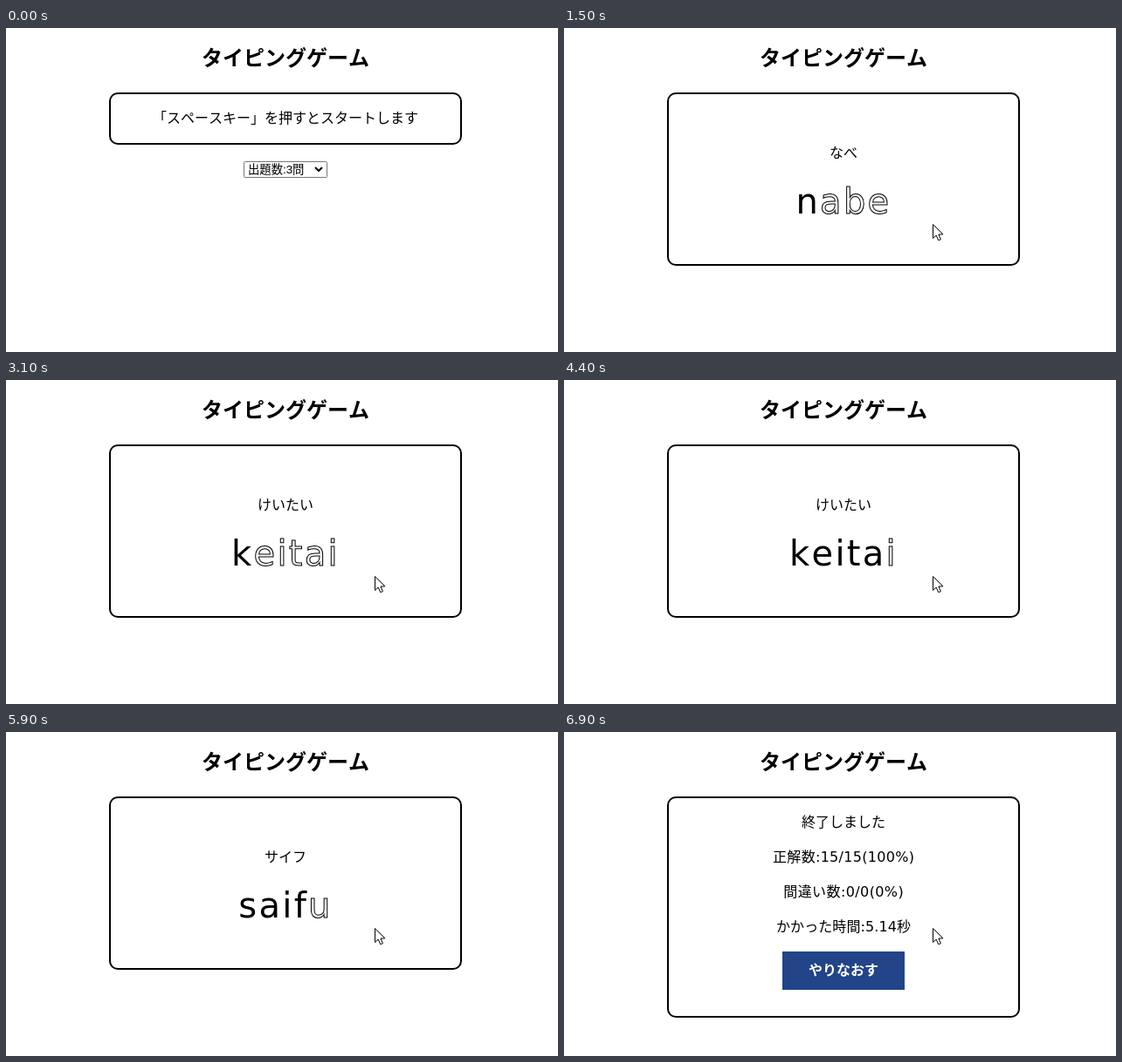
Animation, 632 px wide and 372 px high, one loop 7200 ms. Source, as an HTML page with a canvas:

```html
<!DOCTYPE html>
<html lang="ja">
<head>
<meta charset="utf-8">
<title>タイピングゲーム</title>
<style>
  html, body { margin: 0; width: 100%; height: 100%; overflow: hidden; background: #fff; }
  canvas { display: block; width: 632px; height: 372px; }
</style>
</head>
<body>
<canvas id="stage"></canvas>
<script>
const W = 632, H = 372, MID = 320;
const LOOP = 7200, STEP = 100;
const START = 800, END = 6000;
const JP = '"Noto Sans CJK JP", "Noto Sans CJK", sans-serif';
const MIXED = '"DejaVu Sans", ' + JP;
const FORM = '"Liberation Sans", ' + JP;

// keys: time at which each letter is typed; the last one ends the word
const WORDS = [
  { kana: 'なべ', text: 'nabe', keys: [1500, 1800, 2000, 2200] },
  { kana: 'けいたい', text: 'keitai', keys: [3100, 3200, 3600, 3900, 4300, 4500] },
  { kana: 'サイフ', text: 'saifu', keys: [5200, 5300, 5500, 5800, END] }
];

const canvas = document.getElementById('stage');
const scale = window.devicePixelRatio || 1;
canvas.width = Math.round(W * scale);
canvas.height = Math.round(H * scale);
const ctx = canvas.getContext('2d');

function label(text, y, { font = '16px ' + MIXED, color = '#000', spacing = 0 } = {}) {
  ctx.font = font;
  ctx.fillStyle = color;
  ctx.letterSpacing = spacing + 'px';
  ctx.textAlign = 'center';
  ctx.fillText(text, MID + spacing / 2, y);
  ctx.letterSpacing = '0px';
  ctx.textAlign = 'left';
}

function panel(height) {
  ctx.strokeStyle = '#000';
  ctx.lineWidth = 2;
  ctx.beginPath();
  ctx.roundRect(119, 75, 402, height - 2, 9);
  ctx.stroke();
}

function select() {
  ctx.strokeStyle = '#767676';
  ctx.lineWidth = 1;
  ctx.beginPath();
  ctx.roundRect(272.5, 153.5, 95, 18, 1);
  ctx.stroke();
  ctx.font = '13.333px ' + FORM;
  ctx.fillStyle = '#000';
  ctx.fillText('出題数:3問', 277, 167);
  ctx.strokeStyle = '#000';
  ctx.lineWidth = 2;
  ctx.beginPath();
  ctx.moveTo(354, 160);
  ctx.lineTo(358, 164);
  ctx.lineTo(362, 160);
  ctx.stroke();
}

function startScreen() {
  panel(60);
  label('「スペースキー」を押すとスタートします', 109);
  select();
}

function typingScreen(t) {
  const word = WORDS.find(w => t < w.keys[w.keys.length - 1]);
  const typed = word.keys.filter(k => k <= t).length;
  const gap = 2.3;
  panel(199);
  label(word.kana, 149);

  ctx.font = '40px ' + MIXED;
  ctx.fillStyle = ctx.strokeStyle = '#000';
  ctx.lineWidth = 1;
  ctx.lineJoin = 'miter';
  const chars = [...word.text];
  const widths = chars.map(c => ctx.measureText(c).width + gap);
  let x = MID - widths.reduce((a, b) => a + b) / 2;
  chars.forEach((c, i) => {
    if (i < typed) ctx.fillText(c, x, 213);
    else ctx.strokeText(c, x, 213);
    x += widths[i];
  });
}

function resultScreen() {
  panel(254);
  label('終了しました', 109);
  label('正解数:15/15(100%)', 149, { spacing: 0.3 });
  label('間違い数:0/0(0%)', 189, { spacing: 0.4 });
  label('かかった時間:5.14秒', 229, { spacing: 0.1 });
  ctx.fillStyle = '#224488';
  ctx.fillRect(250, 252, 140, 44);
  label('やりなおす', 279, { font: 'bold 16px ' + JP, color: '#fff' });
}

function pointer(t) {
  if (t < 400) return;
  const left = 1 - Math.min(1, (t - 400) / 300);
  const ease = left * left;
  ctx.save();
  ctx.translate(422.5 + 14 * ease, 225.5 + 130 * ease);
  ctx.beginPath();
  ctx.moveTo(0, 0);
  [[0, 16], [3.7, 12.6], [6.3, 18.3], [8.9, 17.2], [6.4, 11.6], [11.4, 11.4]]
    .forEach(([x, y]) => ctx.lineTo(x, y));
  ctx.closePath();
  ctx.fillStyle = '#fff';
  ctx.fill();
  ctx.strokeStyle = '#000';
  ctx.lineWidth = 1;
  ctx.lineJoin = 'round';
  ctx.stroke();
  ctx.restore();
}

function draw(t) {
  ctx.setTransform(scale, 0, 0, scale, 0, 0);
  ctx.fillStyle = '#fff';
  ctx.fillRect(0, 0, W, H);
  label('タイピングゲーム', 43, { font: 'bold 24px ' + JP });
  if (t < START) startScreen();
  else if (t < END) typingScreen(t);
  else resultScreen();
  pointer(t);
}

const origin = performance.now();
function tick() {
  const t = (performance.now() - origin) % LOOP;
  draw(Math.floor(t / STEP) * STEP);
  requestAnimationFrame(tick);
}
tick();
</script>
</body>
</html>
```
